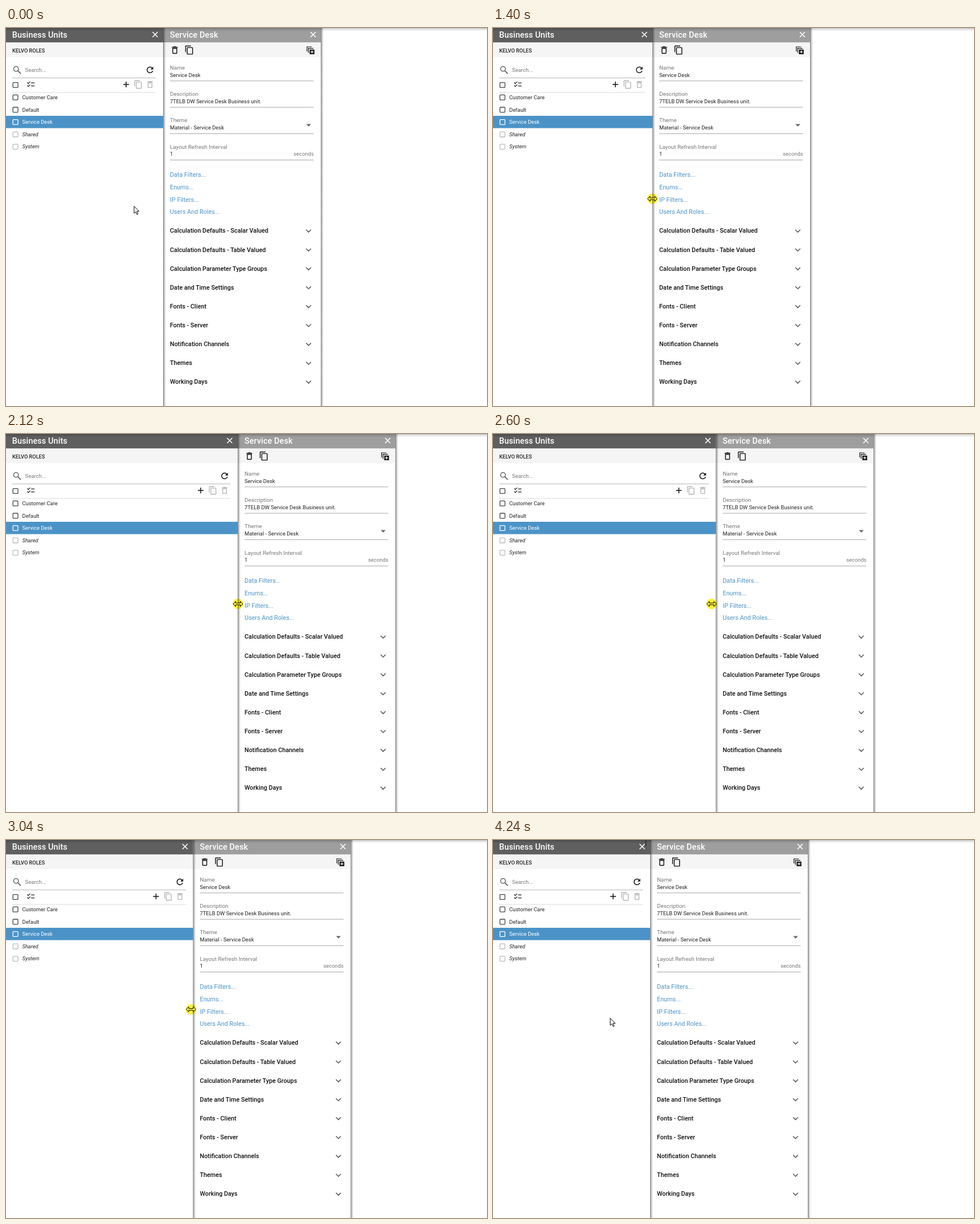
An HTML page that plays this animation: 845x663 px, repeating every 4.4 s.

```html
<!DOCTYPE html>
<html lang="en">
<head>
<meta charset="utf-8">
<title>Resizable panels</title>
<style>
  html, body { margin: 0; width: 100%; height: 100%; overflow: hidden; background: #fff; }
  svg { display: block; }
  text { font-family: Roboto, "Noto Sans", sans-serif; white-space: pre; }
  #glow { mix-blend-mode: multiply; }
</style>
</head>
<body>
<svg id="stage" width="845" height="663" viewBox="0 0 845 663">
  <defs>
    <linearGradient id="side">
      <stop offset="0" stop-opacity=".55"/><stop offset=".35" stop-opacity=".25"/><stop offset="1" stop-opacity="0"/>
    </linearGradient>
    <linearGradient id="top" x2="0" y2="1">
      <stop offset="0" stop-opacity=".25"/><stop offset=".4" stop-opacity=".1"/><stop offset="1" stop-opacity="0"/>
    </linearGradient>
  </defs>
  <g id="list"></g>
  <g id="tools"></g>
  <g id="detail"></g>
  <rect width="845" height="6" fill="url(#top)"/>
  <rect id="caret" x="268" width="1" height="11" fill="#1c1c1c"/>
  <g id="pointer" stroke="#000" fill="#fff" stroke-linejoin="miter">
    <path id="arrow" d="M.5 .5v12.6l2.9-2.7 2.1 4.6 2-.9-2.1-4.5h3.9z"/>
    <path id="resize" d="M-8.5 0l4.5-4.5v3h8v-3l4.5 4.5-4.5 4.5v-3h-8v3z"/>
    <circle id="glow" r="9.2" fill="#fcf13c" stroke="none"/>
  </g>
</svg>
<script>
const $ = id => document.getElementById(id);
const LOOP = 4400, SPLIT = 276, BLUE = '#4b93c7';

const text = (x, cy, size, fill, str, extra = '') =>
  `<text x="${x}" y="${cy + size * .355}" font-size="${size}" fill="${fill}" ${extra}>${str}</text>`;
const rect = (x, y, w, h, fill) => `<rect x="${x}" y="${y}" width="${w}" height="${h}" fill="${fill}"/>`;
const stroke = (d, color, width = 1.5) => `<path d="${d}" fill="none" stroke="${color}" stroke-width="${width}"/>`;
const box = (cy, color) =>
  `<rect x="12.2" y="${cy - 4.4}" width="8.8" height="8.8" rx="1" fill="none" stroke="${color}" stroke-width="1.3"/>`;
const close = x => stroke(`M${x - 4.5} 7l9 9m0-9l-9 9`, '#fff', 1.6);
const icon = (name, cx, cy, fill, scale = .72) =>
  `<path transform="translate(${cx} ${cy}) scale(${scale}) translate(-12 -12)" fill="${fill}" d="${ICONS[name]}"/>`;

const ICONS = {
  refresh: 'M17.65 6.35C16.2 4.9 14.21 4 12 4c-4.42 0-8 3.58-8 8s3.58 8 8 8c3.73 0 6.84-2.55 7.73-6h-2.08c-.82 2.33-3.04 4-5.65 4-3.31 0-6-2.69-6-6s2.69-6 6-6c1.66 0 3.14.69 4.22 1.78L13 11h7V4z',
  trash: 'M6 19c0 1.1.9 2 2 2h8c1.1 0 2-.9 2-2V7H6zM8 9h8v10H8zm7.5-5l-1-1h-5l-1 1H5v2h14V4z',
  copy: 'M16 1H4c-1.1 0-2 .9-2 2v14h2V3h12zm3 4H8c-1.1 0-2 .9-2 2v14c0 1.1.9 2 2 2h11c1.1 0 2-.9 2-2V7c0-1.1-.9-2-2-2zm0 16H8V7h11z',
  checks: 'M22 7h-9v2h9zm0 8h-9v2h9zM5.54 11L2 7.46l1.41-1.41 2.12 2.12 4.24-4.24 1.41 1.41zm0 8L2 15.46l1.41-1.41 2.12 2.12 4.24-4.24 1.41 1.41z'
};

const TITLE = 'font-weight="500" letter-spacing=".1"';

function listPanel() {
  const rows = [['Customer Care', '#222', '#444'], ['Default', '#222', '#444'],
    ['Service Desk', '#fff', '#fff'], ['Shared', '#222', '#bbb', 'font-style="italic"'],
    ['System', '#222', '#bbb', 'font-style="italic"']];
  return rect(0, 0, 845, 25.5, '#5f5f5f') + rect(0, 25.5, 845, 25.5, '#f5f5f5') +
    text(10.8, 12.2, 14.4, '#fff', 'Business Units', TITLE) +
    text(11, 39.3, 9.2, '#222', 'KELVO ROLES', 'font-weight="500"') +
    `<circle cx="17.6" cy="71.8" r="4.2" fill="none" stroke="#666" stroke-width="1.5"/>` +
    stroke('M20.6 74.8l5.4 5.4', '#666', 1.9) +
    text(33.5, 73.8, 9.5, '#777', 'Search...') +
    '<path id="rules"/><path id="thick"/>' +
    box(100, '#444') + icon('checks', 43.5, 99, '#222', .66) +
    rect(0, 154, 845, 21.6, BLUE) +
    rows.map(([name, ink, edge, style], i) => {
      const cy = 121.6 + 21.6 * i;
      return box(cy + .2, edge) + text(28.5, cy, 9.36, ink, name, style);
    }).join('');
}

function listTools() {
  return close(262) + icon('refresh', 253, 73.5, '#111') +
    stroke('M206 99h10m-5-5v10', '#111', 1.5) +
    icon('copy', 232.3, 99, '#b5b5b5', .68) + icon('trash', 253, 99, '#b5b5b5', .68);
}

function detailPanel() {
  const fields = [['Name', 'Service Desk'], ['Description', '7TELB DW Service Desk Business unit.'],
    ['Theme', 'Material - Service Desk'], ['Layout Refresh Interval', '1']];
  const links = ['Data Filters...', 'Enums...', 'IP Filters...', 'Users And Roles...'];
  const sections = ['Calculation Defaults - Scalar Valued', 'Calculation Defaults - Table Valued',
    'Calculation Parameter Type Groups', 'Date and Time Settings', 'Fonts - Client',
    'Fonts - Server', 'Notification Channels', 'Themes', 'Working Days'];
  return rect(SPLIT, 0, 845, 663, '#fff') +
    rect(SPLIT, 0, 277, 25.5, '#9e9e9e') + rect(SPLIT, 25.5, 277, 25.5, '#f5f5f5') +
    rect(SPLIT, 0, 5, 663, 'url(#side)') + rect(553, 0, 5, 663, 'url(#side)') +
    text(288, 12.2, 14.4, '#fff', 'Service Desk', TITLE) + close(539.5) +
    icon('trash', 296.5, 38.7, '#111') + icon('copy', 322, 38.7, '#111') +
    stroke('M528.8 41v-8h8.5M531.3 43.6v-8h8.5', '#111', 1.2) +
    rect(533.4, 37.8, 8.4, 8.2, '#111') + stroke('M535 41.9h5.2m-2.6-2.6v5.2', '#fff', 1.2) +
    fields.map(([label, value], i) => {
      const y = 46.25 * i;
      return text(288, 69.3 + y, 9.9, '#777', label) + text(288, 82.3 + y, 9.4, '#222', value) +
        rect(288, 92.3 + y, 252.5, 1, '#a5a5a5');
    }).join('') +
    '<path d="M527.3 168.5h8.6l-4.3 4.3z" fill="#666"/>' +
    text(540.5, 221, 9.36, '#777', 'seconds', 'text-anchor="end"') +
    links.map((name, i) => text(288, 257.6 + 21.6 * i, 10.8, BLUE, name)).join('') +
    sections.map((name, i) => {
      const cy = 355.6 + 33.13 * i;
      return text(288, cy, 10.8, '#111', name, 'font-weight="500"') +
        stroke(`M527.2 ${cy - 1.8}l4.3 4.3 4.3-4.3`, '#555', 1.5);
    }).join('');
}

$('list').innerHTML = listPanel();
$('tools').innerHTML = listTools();
$('detail').innerHTML = detailPanel();

// [time, panel shift]
const SHIFT = [[1340, 0], [1400, 4], [1520, 25], [1680, 59.4], [1800, 84], [1920, 104], [2120, 131],
  [2200, 138], [2320, 143], [2400, 138], [2520, 124], [2600, 115.5], [3040, 52.5], [3120, 41],
  [3320, 14], [3480, 0]];
// [time, pointer x, pointer y]
const POINTER = [[260, 224.5, 312], [400, 231, 310], [600, 254, 304], [760, 270, 300.5], [840, 274.5, 299.5],
  [1340, 274.5, 299.5], [1400, 280, 299.5], [1520, 302, 299.5], [1680, 337.5, 299.5], [1920, 381, 299],
  [2120, 407.5, 298], [2320, 417, 298], [2440, 406, 298], [2600, 384, 298], [3040, 325, 297],
  [3320, 287, 298], [3560, 267, 302], [3720, 256, 306], [4000, 224, 311], [4160, 208, 312], [4240, 205.5, 312]];
const TICKS = [0, 80, 120, 200, 280, 320, 400, 440, 520];

// Motion advances in uneven ticks that repeat every 600 ms.
function tick(t) {
  const base = t < 1400 ? 320 : 1400;
  if (t < base && base === 320) return 0;
  const phase = (t - base) % 600;
  return t - phase + TICKS.filter(o => o <= phase).pop();
}

function sample(table, t, col = 1) {
  const i = table.findIndex(row => row[0] > t);
  if (i < 0) return table[table.length - 1][col];
  if (i === 0) return table[0][col];
  const a = table[i - 1], b = table[i];
  return a[col] + (b[col] - a[col]) * (t - a[0]) / (b[0] - a[0]);
}

const during = (t, ...spans) => spans.some(([from, to]) => t >= from && t < to);
const show = (id, on) => $(id).setAttribute('visibility', on ? 'visible' : 'hidden');

function draw(t) {
  const now = tick(t), shift = sample(SHIFT, now), right = 263.5 + shift;
  for (const id of ['tools', 'detail']) $(id).setAttribute('transform', `translate(${shift} 0)`);
  $('thick').setAttribute('d', `M11 86.5H${right}v2H11z`);
  $('rules').setAttribute('d', `M11 112.5H${right}v1H11z`);
  $('pointer').setAttribute('transform', `translate(${sample(POINTER, now)} ${sample(POINTER, now, 2)})`);
  const resizing = during(t, [720, 3600]);
  show('arrow', !resizing);
  show('resize', resizing);
  show('glow', during(t, [1200, 3480]));
  show('caret', during(t, [80, 600], [1040, 1200], [4240, LOOP]));
}

$('thick').setAttribute('fill', '#d6d6d6');
$('rules').setAttribute('fill', '#d9d9d9');

const start = performance.now();
function frame() {
  draw((performance.now() - start) % LOOP);
  requestAnimationFrame(frame);
}
frame();
</script>
</body>
</html>
```
